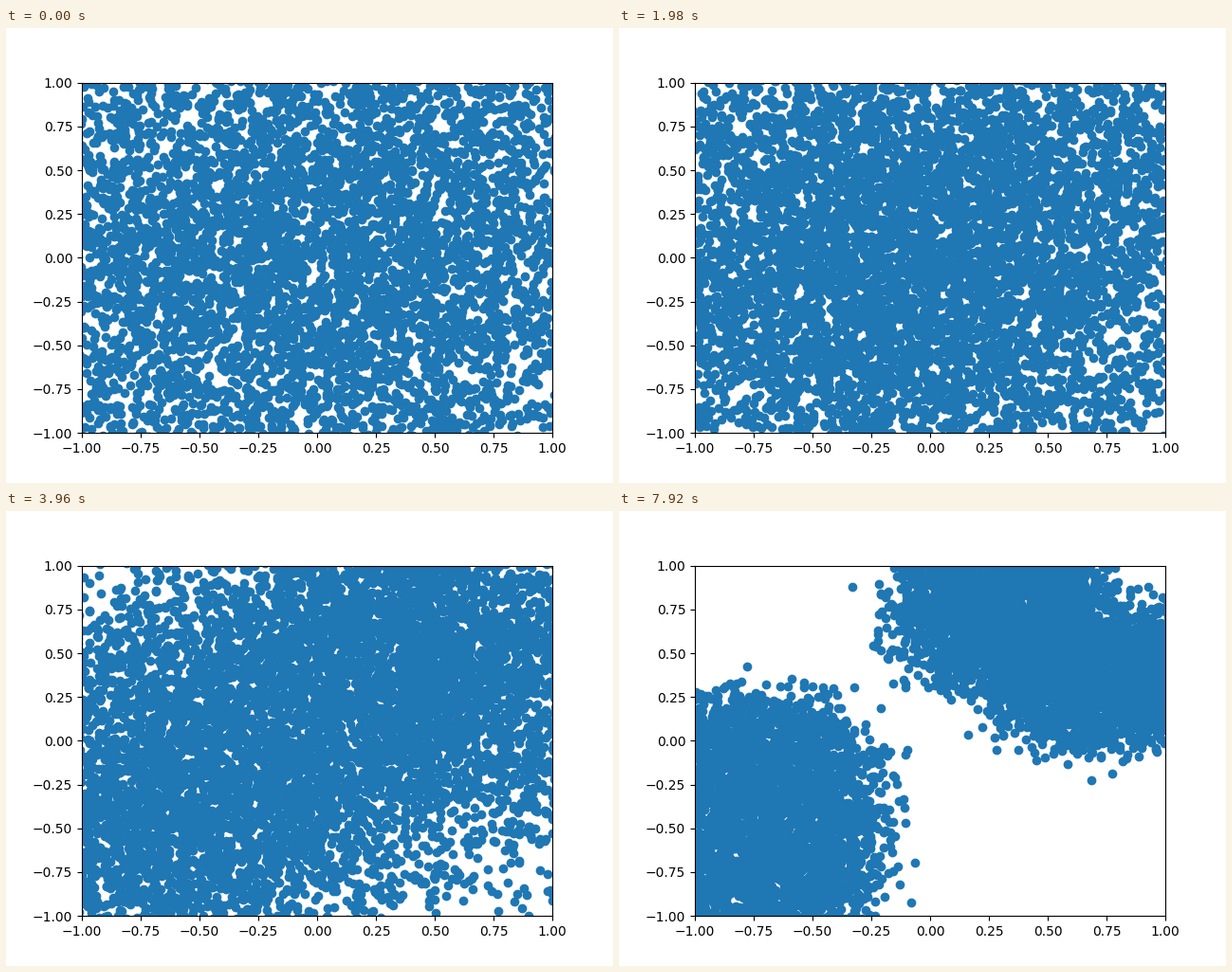
Animation of 640x480 px, one loop 8 s. Source, as a matplotlib script:

```python
import numpy as np
import matplotlib.pyplot as plt
from matplotlib.animation import FuncAnimation

LOOP = 8000       # ms
TICK = 40         # ms per animation frame
HOLD = 330        # ms each cloud stays on screen
STEPS = 25
SETTLE = 21       # step at which the noise is gone
BLUR = 0.09       # softness of the final blobs
MEMORY = 0.6      # share of the noise kept from step to step

rng = np.random.default_rng(7)


def blob(n, center, radii, power):
    """n points spread evenly over a superellipse."""
    p = rng.uniform(-1, 1, (3 * n, 2))
    p = p[(np.abs(p) ** power).sum(axis=1) <= 1][:n]
    return p * radii + center


def denoise(core):
    """One cloud per step, from pure noise to the blurred core."""
    eps = rng.normal(size=core.shape)
    clouds = []
    for k in range(STEPS):
        u = min(k / SETTLE, 1)
        noise = 1 - u ** 1.2
        signal = np.sin(np.pi / 2 * u)
        clouds.append(signal * core + np.hypot(noise, signal * BLUR) * eps)
        fresh = rng.normal(size=core.shape)
        eps = MEMORY * eps + np.sqrt(1 - MEMORY ** 2) * fresh
    return clouds


core = np.vstack([
    blob(4800, (-0.83, -0.48), (0.56, 0.70), 3.0),
    blob(2700, (0.29, 0.77), (0.38, 0.45), 2.4),
    blob(2500, (0.74, 0.37), (0.45, 0.36), 2.4),
])
clouds = denoise(core)

fig, ax = plt.subplots(figsize=(6.4, 4.8), dpi=100)
ax.set_xlim(-1, 1)
ax.set_ylim(-1, 1)
dots = ax.scatter(*clouds[0].T, color="#1f77b4")


def update(i):
    step = int((i * TICK + TICK / 2) // HOLD)
    dots.set_offsets(clouds[min(step, STEPS - 1)])
    return dots,


anim = FuncAnimation(fig, update, frames=LOOP // TICK, interval=TICK,
                     repeat=True, repeat_delay=0)
plt.show()
```
